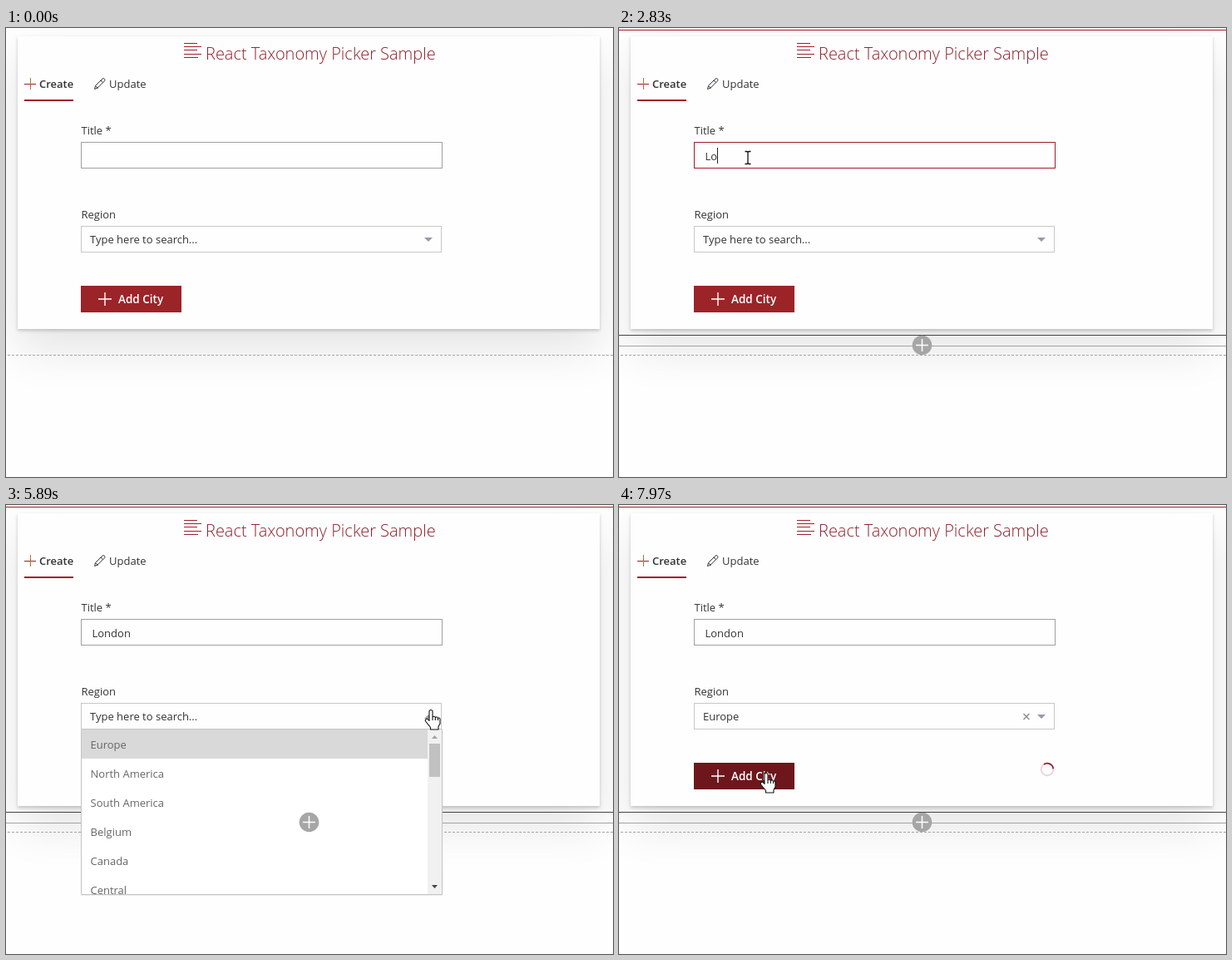
Animation of 730x540 px, one loop 8 s. Source, as an HTML page:

```html
<!DOCTYPE html>
<html lang="en">
<head>
<meta charset="utf-8">
<title>React Taxonomy Picker Sample</title>
<style>
html, body { margin: 0; width: 100%; height: 100%; overflow: hidden; background: #fefefe; }
#stage { position: relative; width: 730px; height: 540px; overflow: hidden; }
#card { position: absolute; left: 14px; top: 10px; width: 700px; height: 352px; background: #fefefe;
  box-shadow: 0 2px 4px rgba(0,0,0,.2), 0 25px 50px rgba(0,0,0,.1); }
svg { position: absolute; left: 0; top: 0; }
text { font: 13px "Open Sans", "Noto Sans", sans-serif; fill: #333; white-space: pre; }
.head { font-size: 20px; font-weight: 300; fill: #8f202a; }
.semi { font-weight: 600; }
.line { fill: none; stroke: #a4a4a4; }
.red { stroke: #a01c2c; }
#menu text { fill: #666; }
</style>
</head>
<body>
<div id="stage">
<div id="card"></div>
<svg width="730" height="540" viewBox="0 0 730 540">
  <path class="line" stroke-dasharray="3 2" d="M2 393.5H730"/>
  <g id="zone">
    <path id="top" class="line" d="M0 2.5H730"/>
    <path id="bottom" class="line" d="M0 369.5H730"/>
    <path class="line" d="M0 382.5H730"/>
  </g>

  <path class="line red" d="M214 18.5h16M214 22.5h21M214 26.5h16M214 31.5h21M214 35.5h17"/>
  <text class="head" x="240" y="38">React Taxonomy Picker Sample</text>
  <path class="line red" d="M22 67.5h14"/>
  <path class="line" stroke="#b5702f" style="stroke:#b5702f" d="M29.5 60v14"/>
  <text class="semi" x="40" y="72">Create</text>
  <path fill="#a01c2c" d="M22 86h59v2H22z"/>
  <path class="line" style="stroke:#334" d="M106.5 73.5l1-4 8.3-8.3q1.300-1.200 2.600 0t0 2.600l-8.300 8.300zM114 63l3 3M107.500 69.500l3 3"/>
  <text x="124" y="72">Update</text>

  <text x="90.500" y="128">Title *</text>
  <rect id="title" class="line" x="90.500" y="137.500" width="434" height="31"/>
  <text id="typed" x="103.500" y="159"></text>
  <path id="caret" stroke="#222" d="M.5 144v19"/>

  <text x="90.500" y="229">Region</text>
  <rect id="glow" x="88.500" y="236.500" width="437" height="35" rx="2" fill="none" stroke="#007eff" stroke-opacity=".1" stroke-width="3"/>
  <rect id="select" class="line" x="90.500" y="238.500" width="433" height="31"/>
  <text id="value" x="101" y="259"></text>
  <path id="clear" class="line" stroke-width="1.300" style="stroke:#888" d="M486.500 251l7 7m0-7l-7 7"/>
  <path id="arrow" fill="#9999ab"/>

  <rect id="button" x="90" y="310" width="121" height="32"/>
  <path stroke="#fff" stroke-width="1.400" d="M111 326h16M119 318v16"/>
  <text class="semi" x="135" y="331" style="fill:#fff;font-size:13.500px">Add City</text>
  <g id="spinner" fill="none" stroke-width="1.700">
    <circle cx="515" cy="318" r="7.300" stroke="#ecd0d3"/>
    <path id="arc" stroke="#a01c2c" d="M508.700 314.300A7.300 7.300 0 0 1 521.300 314.300"/>
  </g>

  <g id="menu">
    <path fill="#0001" d="M90 469h435v1H90z"/>
    <path fill="#fff" stroke="#c4c4c4" d="M90.500 269.500h434v199h-434z"/>
    <path fill="#d9d9d9" d="M91 270h416v35H91z"/>
    <clipPath id="fit"><path d="M91 270h416v198H91z"/></clipPath>
    <g id="options" clip-path="url(#fit)"></g>
    <path fill="#f1f1f1" d="M507 270h17v198h-17z"/>
    <path fill="#c1c1c1" d="M509 287h13v40h-13z"/>
    <path fill="#a3a3a3" d="M512 281l3.500-4 3.500 4z"/>
    <path fill="#444" d="M512 457l3.500 4 3.500-4z"/>
  </g>
  <g id="plus">
    <circle cx="364.500" cy="381.500" r="11.800" fill="#a6a6a6"/>
    <path id="cross" stroke-width="1.500" d="M357 381.500h15M364.500 374v15"/>
  </g>
  <path id="cursor" stroke-linejoin="round"/>
</svg>
</div>
<script>
const $ = id => document.getElementById(id);
const set = (id, name, value) => $(id).setAttribute(name, value);
const show = (id, on) => set(id, 'visibility', on ? 'visible' : 'hidden');

$('options').innerHTML = ['Europe', 'North America', 'South America', 'Belgium', 'Canada', 'Central']
  .map((name, i) => `<text x="101.500" y="${293 + 35 * i}">${name}</text>`).join('');

const shapes = {
  arrow: 'M.5.500V16.500L4.200 13 6.700 18.800 9 17.700 6.500 12H11.500Z',
  beam: 'M-3.500-7.500h2.500l1 1 1-1h2.500M0-6.500V6.500M-3.500 7.500h2.500l1-1 1 1h2.500',
  hand: 'M-2 1.500a2 2 0 0 1 4 0V8a1.800 1.600 0 0 1 3.300.6a1.800 1.600 0 0 1 3.200.8a1.500 1.600 0 0 1 2.500 1.400V16L9 19.500V23H-.5V20.500L-6.500 13a1.900 1.900 0 0 1 3-2.200L-2 12.500ZM2 8v4M5.300 8.600V12M8.500 9.400V12'
};

// Pointer stops: time, x, y
const stops = [
  [590, 330, 464], [1120, 155, 156], [5000, 155, 156], [5500, 533, 245], [5720, 511, 247],
  [6170, 511, 247], [6720, 197, 286], [6900, 197, 286], [7170, 231, 283], [7280, 231, 283],
  [7350, 232, 281], [7370, 232, 281], [7720, 177, 323]
];
const keys = [2430, 2830, 3200, 3660, 3990, 4230];
const caretOn = [[1370, 1910], [2430, 4760], [5000, 5890]];
const LOOP = 8000;

function pointer(t) {
  const i = stops.findIndex(s => s[0] > t);
  if (i < 1) return stops[i < 0 ? stops.length - 1 : 0].slice(1);
  const [a, b] = [stops[i - 1], stops[i]];
  const u = (t - a[0]) / (b[0] - a[0]);
  const k = u * u * (3 - 2 * u);
  return [a[1] + (b[1] - a[1]) * k, a[2] + (b[2] - a[2]) * k];
}

function draw(t) {
  const [x, y] = pointer(t);
  const over = (l, top, r, b) => x >= l && x <= r && y >= top && y <= b;
  const open = t >= 5890 && t < 6860;
  const picked = t >= 6860;
  const pressed = t >= 7790;
  const focused = t >= 1370 && t < 5890;
  const hover = t >= 590 && y < 393;
  const onTitle = over(90, 137, 525, 169);
  const onButton = !open && over(90, 310, 211, 342);
  const onSelect = over(90, 238, 525, open ? 469 : 270);

  show('zone', hover);
  show('plus', hover);
  $('top').style.stroke = t >= 1370 ? '#a01c2c' : '#a6a6a6';
  $('bottom').style.stroke = t >= 1370 ? '#444' : '#a6a6a6';
  set('cross', 'stroke', t < 1680 ? '#f4f4f4' : '#fff');

  $('title').style.stroke = focused ? '#a01c2c' : onTitle && t > 590 ? '#444' : '#a0a0a0';
  const count = keys.filter(k => t >= k).length;
  $('typed').textContent = 'London'.slice(0, count);
  show('caret', caretOn.some(([a, b]) => t >= a && t < b));
  set('caret', 'transform', `translate(${count ? 102 + 8 * count : 103})`);

  $('value').textContent = picked ? 'Europe' : 'Type here to search...';
  show('menu', open);
  $('options').firstChild.style.fill = t > 6250 ? '#333' : '#666';
  show('glow', picked && !pressed);
  show('clear', picked);
  $('select').style.stroke = picked && !pressed ? '#5c5c68' : '#c8c8c8';
  set('arrow', 'd', open ? 'M503 257l5-5 5 5z' : 'M503 252l5 5 5-5z');

  set('button', 'fill', pressed ? '#6d171d' : onButton && t > 7350 ? '#84191f' : '#9b2428');
  show('spinner', t >= 7860);
  set('arc', 'transform', `rotate(${(t - 7970) * 0.28 + 25} 515 318)`);

  const kind = onTitle ? 'beam' : onSelect || onButton ? 'hand' : 'arrow';
  show('cursor', t >= 590);
  set('cursor', 'd', shapes[kind]);
  set('cursor', 'fill', kind === 'beam' ? 'none' : '#fff');
  set('cursor', 'stroke', '#111');
  set('cursor', 'stroke-width', kind === 'beam' ? 1.3 : 1.1);
  set('cursor', 'transform', `translate(${Math.round(x)} ${Math.round(y)})`);
}

const start = performance.now();
function tick() {
  draw((performance.now() - start) % LOOP);
  requestAnimationFrame(tick);
}
tick();
</script>
</body>
</html>
```
